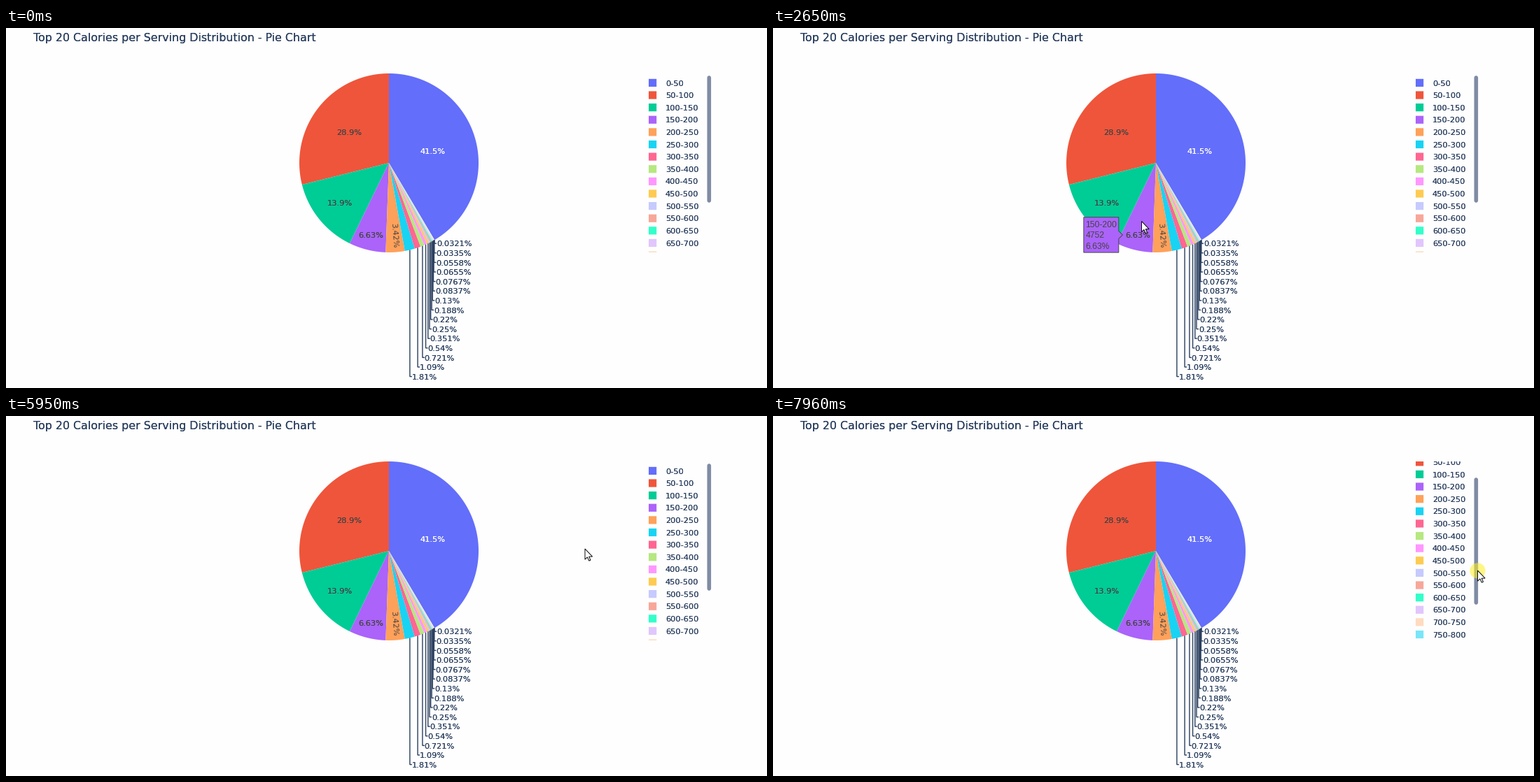
A matplotlib script that plays this animation: 1087 by 515 pixels, repeating every 7990 ms.

```python
import colorsys
import numpy as np
import matplotlib.pyplot as plt
from matplotlib.animation import FuncAnimation
from matplotlib.colors import to_rgb

W, H, DPI = 1087, 515, 64
FRAMES, STEP = 235, 34
PT = 72 / DPI                       # points per pixel
CX, CY, R = 547, 193, 128
NAVY, GREY = "#2a3f5f", "#444444"

COUNTS = [29771, 20732, 9962, 4752, 2453, 1298, 782, 517, 387, 252,
          179, 158, 135, 93, 60, 55, 47, 40, 24, 23]
BASE = ["#636EFA", "#EF553B", "#00CC96", "#AB63FA", "#FFA15A",
        "#19D3F3", "#FF6692", "#B6E880", "#FF97FF", "#FECB52"]

# Cursor moves: start time, end time, place reached
ENTRY = np.array([1015, 505])
MOVES = [(120, 320, (746, 366)), (580, 870, (602, 266)),
         (1290, 2080, (574, 275)), (2100, 2880, (512, 277)),
         (2910, 3690, (500, 252)), (3710, 4085, (486, 205)),
         (4085, 4460, (505, 168)), (4560, 4640, (519, 158)),
         (4640, 5340, (589, 158)), (5360, 5520, (597, 163)),
         (5780, 5950, (827, 190)), (6230, 6700, (1029, 199)),
         (6700, 6950, (1004, 201)), (7640, 7960, (1006.5, 221))]
PRESS, DRAG, GRAB_Y = 7460, 7640, 201

ARROW = np.array([(0, 0), (0, 15.2), (3.4, 11.9), (5.8, 17.2), (8, 16.2),
                  (5.7, 11.2), (10.6, 11.1)])


def lighten(color):
    h, l, s = colorsys.rgb_to_hls(*to_rgb(color))
    return colorsys.hls_to_rgb(h, min(1, l + 0.2), s)


def polar(angle, r):
    """Point on the pie, angle counterclockwise from the top."""
    return CX - r * np.sin(angle), CY - r * np.cos(angle)


def make_axes(x0, y0, x1, y1, z):
    ax = fig.add_axes([x0 / W, 1 - y1 / H, (x1 - x0) / W, (y1 - y0) / H],
                      zorder=z)
    ax.set_xlim(x0, x1)
    ax.set_ylim(y1, y0)
    ax.set_axis_off()
    return ax


def label(ax, x, y, s, px, color=NAVY, ha="left", font="DejaVu Sans",
          passes=2, **kw):
    """Text centred on y; a second pass strengthens thin strokes."""
    for _ in range(passes):
        text = ax.text(x, y + 0.36 * px, s, fontsize=px * PT, color=color,
                       ha=ha, va="baseline", family=font, **kw)
    return text


def fill(ax, xy, color, edge="none", lw=0, **kw):
    patch = plt.Polygon(xy, closed=True, facecolor=color, edgecolor=edge,
                        linewidth=lw * PT, snap=False, **kw)
    ax.add_patch(patch)
    return patch


def text_width(s, px):
    em = {",": 0.278, ".": 0.278, "-": 0.333, "%": 0.889}
    return px * sum(em.get(c, 0.556) for c in s)


fig = plt.figure(figsize=(W / DPI, H / DPI), dpi=DPI, facecolor="#fefefe")
legend = make_axes(917, 65, 1000, 321, 0)
stage = make_axes(0, 0, W, H, 1)

COLORS = BASE + [lighten(c) for c in BASE]
NAMES = [f"{50 * i}-{50 * i + 50}" for i in range(20)]
total = sum(COUNTS)
SHARES = [f"{100 * n / total:.3g}%" for n in COUNTS]

# Slices run counterclockwise from the top, the largest one last
spans = 2 * np.pi * np.array(COUNTS) / total
ends = np.cumsum(np.roll(spans, -1))
mids = np.roll(ends, 1) - spans / 2
inscribed = np.minimum(1 / (1 + 1 / np.sin(spans / 2)), 0.5)

stage.plot([0, W], [514.5, 514.5], color="#e6e6e6", lw=PT)
label(stage, 39, 12.8, "Top 20 Calories per Serving Distribution - Pie Chart",
      15.9)

for i in range(20):
    arc = np.linspace(mids[i] - spans[i] / 2, mids[i] + spans[i] / 2,
                      3 + int(spans[i] * 60))
    fill(stage, [(CX, CY)] + [polar(a, R) for a in arc], COLORS[i])

for i in range(4):
    x, y = polar(mids[i], R * (1 - inscribed[i]))
    label(stage, x - 0.3, y, SHARES[i], 11.4, GREY if i else "white", "center")
x, y = polar(mids[4], 104)
stage.text(x, y, SHARES[4], fontsize=11.4 * PT, color=GREY, ha="center",
           va="center", family="DejaVu Sans",
           rotation=np.degrees(mids[4]) - 270)

for i in range(5, 20):
    x, y = polar(mids[i], R)
    row = 308.2 + 13.6 * (19 - i)
    stage.plot([x, x, x + 3], [y, row, row], color=NAVY, lw=1.4 * PT,
               solid_capstyle="butt", solid_joinstyle="miter", snap=False)
    label(stage, x + 2.8, row, SHARES[i], 11.4)

for i in range(20):
    y = 78.4 + 17.62 * i
    legend.add_patch(plt.Rectangle((918, y - 5.6), 11.2, 11.2, linewidth=0,
                                   facecolor=COLORS[i], snap=False))
    label(legend, 942, y, NAMES[i], 11.4, clip_on=True)

bar, = stage.plot([1004.3] * 2, [71, 247], color="#808BA4", lw=5.6 * PT,
                  solid_capstyle="round", snap=False)

tip = fill(stage, [(0, 0)] * 7, "white", "white", 0.93, zorder=5)
tip_lines = [label(stage, 0, 0, "", 12.1, font="Liberation Sans", passes=1,
                   zorder=6) for _ in range(3)]
halo = plt.Circle((0, 0), 11, facecolor="#fff01e", alpha=0.55, linewidth=0,
                  zorder=7)
stage.add_patch(halo)
cursor = fill(stage, ARROW, "white", "black", 0.95, zorder=8)


def cursor_at(t):
    pos = ENTRY
    for start, end, goal in MOVES:
        u = np.clip((t - start) / (end - start), 0, 1)
        pos = pos + (np.array(goal) - pos) * u * u * (3 - 2 * u)
    return pos


def slice_at(x, y):
    if np.hypot(x - CX, y - CY) > R:
        return None
    angle = np.arctan2(CX - x, CY - y) % (2 * np.pi)
    return (np.searchsorted(ends, angle) + 1) % 20


def show_tip(i):
    for part in [tip, *tip_lines]:
        part.set_visible(i is not None)
    if i is None:
        return
    n = COUNTS[i]
    lines = [NAMES[i], f"{n:,}" if n > 9999 else str(n), SHARES[i]]
    ink = GREY if i else "white"
    pad, half, gap = 2.8, 25.2, 5.6
    width = max(text_width(s, 12.1) for s in lines) + 2 * pad
    x, y = polar(mids[i], R * (1 - inscribed[i]))
    side = 1 if x > CX else -1
    x += side * inscribed[i] * R
    near, far = x + side * gap, x + side * (gap + width)
    tip.set_xy([(x, y), (near, y - gap), (near, y - half), (far, y - half),
                (far, y + half), (near, y + half), (near, y + gap)])
    tip.set_facecolor(COLORS[i])
    tip.set_edgecolor(ink)
    for k, (line, s) in enumerate(zip(tip_lines, lines)):
        line.set_text(s)
        line.set_color(ink)
        line.set_position((min(near, far) + pad - 0.4,
                           y + 15.7 * (k - 1) + 0.36 * 12.1))


def update(frame):
    t = (frame + 0.5) * STEP
    x, y = cursor_at(t)
    cursor.set_xy(ARROW + (x, y))
    cursor.set_visible(t >= MOVES[0][0])
    halo.center = (x, y + 0.3)
    halo.set_visible(t >= PRESS)
    show_tip(slice_at(x, y))

    drag = y - GRAB_Y if t >= DRAG else 0
    bar.set_ydata([71 + drag, 247 + drag])
    shift = 1.51 * drag
    legend.set_ylim(321 + shift, 65 + shift)
    return []


anim = FuncAnimation(fig, update, frames=FRAMES, interval=STEP, repeat=True,
                     repeat_delay=0, blit=False)
plt.show()
```
